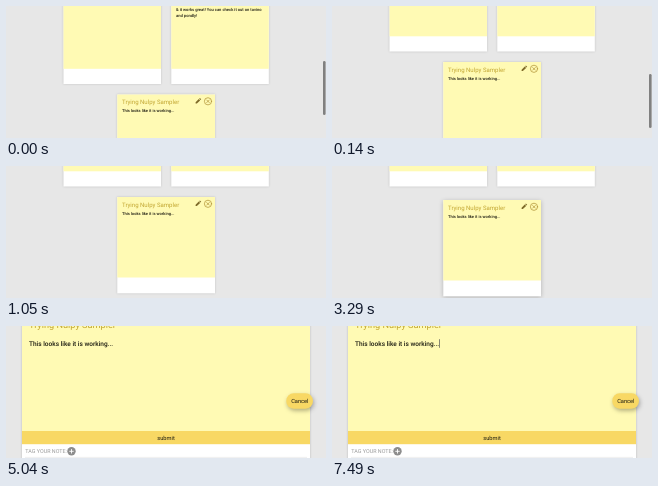
Animation, 320 px wide and 132 px high, one loop 8000 ms. Source, as an HTML page:

```html
<!DOCTYPE html>
<html lang="en">
<head>
<meta charset="utf-8">
<title>Sticky notes</title>
<style>
html, body { margin: 0; width: 100%; height: 100%; overflow: hidden; background: #e7e7e7; }
svg { display: block; width: 320px; height: 132px; }
text { font-family: Roboto, Arial, sans-serif; fill: #1c1b10; text-rendering: geometricPrecision; }
.paper { fill: #fffab4; }
.white { fill: #fff; }
.title { fill: #c2a632; }
.gold { fill: #f8d864; }
.card { filter: drop-shadow(0 .5px .8px rgba(0,0,0,.16)); }
.icon { fill: none; stroke: #b3963a; stroke-width: .75; stroke-linecap: round; }
#cancel { filter: drop-shadow(1px 2.5px 2px rgba(0,0,0,.3)); }
#dialog > .white { filter: drop-shadow(0 0 1px rgba(0,0,0,.2)); }
</style>
</head>
<body>
<svg viewBox="0 0 320 132">
  <rect width="320" height="132" fill="#e7e7e7"/>
  <g id="board">
    <g id="page">
      <g class="card">
        <rect class="white" x="57.5" y="-18" width="97.5" height="96"/>
        <rect class="paper" x="57.5" y="-18" width="97.5" height="80.8"/>
      </g>
      <g class="card">
        <rect class="white" x="165.3" y="-18" width="97.5" height="96"/>
        <rect class="paper" x="165.3" y="-18" width="97.5" height="80.8"/>
      </g>
      <g font-size="4.1" font-weight="500">
        <text x="170" y="4.7">&amp; it works great! You can check it out on tavino</text>
        <text x="170" y="10.7">and pondly!</text>
      </g>
    </g>
    <g id="note">
      <g id="sheet">
        <rect class="white" x="111.3" width="97.7" height="96.3"/>
        <rect class="paper" x="111.3" width="97.7" height="80.5"/>
      </g>
      <text class="title" x="116" y="9.8" font-size="6.05">Trying Nulpy Sampler</text>
      <text x="116" y="17.7" font-size="4.05" font-weight="500">This looks like it is working...</text>
      <path id="pencil" d="M189.6 9.1v-1.3l3.2-3.2 1.3 1.3-3.2 3.2zM193.2 4.2l.7-.7 1.3 1.3-.7.7z"/>
      <circle class="icon" cx="202" cy="6.8" r="3.6"/>
      <path class="icon" d="M200.7 5.5l2.6 2.6M203.3 5.5l-2.6 2.6"/>
    </g>
    <rect id="bar" x="317" width="2.6" height="54" rx="1.3" fill="#808080"/>
  </g>
  <g id="dialog">
    <rect class="white" x="16" y="-5" width="288" height="142"/>
    <rect class="paper" x="16" y="-5" width="288" height="110"/>
    <text class="title" x="23" y="2.3" font-size="9.2">Trying Nulpy Sampler</text>
    <text x="23" y="20" font-size="6.5" font-weight="500">This looks like it is working...</text>
    <rect id="caret" x="107.2" y="13.2" width=".7" height="8.6" fill="#555"/>
    <rect class="gold" x="16" y="105" width="288" height="13.2"/>
    <text x="160" y="113.6" font-size="5.7" text-anchor="middle">submit</text>
    <text x="19.3" y="127.3" font-size="5.4" style="fill:#999">TAG YOUR NOTE:</text>
    <circle cx="65.5" cy="125.3" r="4.2" fill="#8d8d8d"/>
    <path d="M63.3 125.3h4.4M65.5 123.1v4.4" stroke="#fff" stroke-width=".9"/>
    <path d="M19 131.4H301" stroke="#e4e4e4" stroke-width=".6"/>
    <g id="cancel"><rect class="gold" x="280.3" y="67.3" width="26.6" height="15.4" rx="7.2"/></g>
    <text x="293.8" y="77" font-size="5.7" text-anchor="middle">Cancel</text>
  </g>
</svg>
<script>
const LOOP = 8000;
// Each track lists [time in ms, value]; values hold until the next step.
const tracks = {
  scroll: [[0, 0], [70, 17], [140, 32.5], [210, 47], [280, 57.5]],
  bar: [[0, 1], [910, .6], [980, .25], [1050, 0]],
  lift: [[0, 0], [3290, 3], [3360, 4.4], [3430, 5]],
  ink: [[0, 0], [3850, .2], [3920, .4], [3990, .6], [4060, .8], [4130, 1]],
  dialog: [[0, 0], [5040, 1]],
  caret: [[0, 0], [7490, 1]]
};
const $ = id => document.getElementById(id);
const [board, page, note, sheet, pencil, bar, dialog, caret] =
  ["board", "page", "note", "sheet", "pencil", "bar", "dialog", "caret"].map($);

function at(name, t) {
  return tracks[name].reduce((value, [time, next]) => t >= time ? next : value, 0);
}
const show = (el, on) => { el.style.display = on ? "" : "none"; };
const moveY = (el, y) => el.setAttribute("transform", `translate(0 ${y})`);

function draw(t) {
  const scroll = at("scroll", t), lift = at("lift", t), ink = at("ink", t);
  moveY(page, -scroll);
  moveY(note, 88.5 - scroll + lift);
  sheet.style.filter =
    `drop-shadow(0 ${.5 + lift * .25}px ${.8 + lift * .4}px rgba(0,0,0,${.16 + lift * .025}))`;
  const mix = v => Math.round(v * (1 - ink) + 25 * ink);
  pencil.setAttribute("fill", `rgb(${mix(125)},${mix(105)},${mix(40)})`);
  bar.setAttribute("y", 55 + scroll * .4);
  bar.setAttribute("opacity", at("bar", t));
  const open = at("dialog", t);
  show(board, !open);
  show(dialog, open);
  show(caret, at("caret", t));
}

const start = performance.now();
function tick() {
  draw((performance.now() - start) % LOOP);
  requestAnimationFrame(tick);
}
draw(0);
requestAnimationFrame(tick);
</script>
</body>
</html>
```
